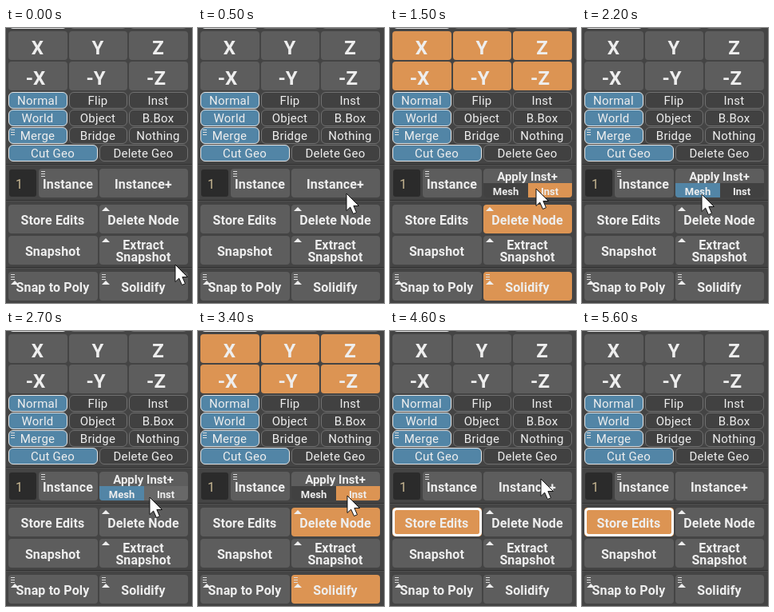
An HTML page that plays this animation: 233x344 px, repeating every 6 s.

```html
<!DOCTYPE html>
<html lang="en">
<head>
<meta charset="utf-8">
<title>Tool panel</title>
<style>
  html, body { margin: 0; width: 100%; height: 100%; overflow: hidden; background: #444; }
  svg { display: block; width: 233px; height: 344px; }
  text { font-family: Roboto, "Open Sans", sans-serif; fill: #eee; text-anchor: middle; }
  .big { font-size: 24px; font-weight: 700; }
  .bold { font-size: 16px; font-weight: 700; letter-spacing: .15px; }
  .apply { font-size: 15px; font-weight: 700; }
  .small { font-size: 13px; font-weight: 700; }
  .pill { font-size: 15px; letter-spacing: .25px; }
  .number { font-size: 16px; fill: #c9b994; }
</style>
</head>
<body>
<svg id="stage" viewBox="0 0 233 344"></svg>
<script>
const GRAY = '#5d5d5d', DARK = '#414141', HOVER = '#686868', PRESS = '#2b2b2b';
const BLUE = '#5285a6', ORANGE = '#dc9453', LIGHT = '#eee';
const LOOP = 6000, STEP = 100;
const stage = document.getElementById('stage');

function add(tag, attrs, parent = stage) {
  const node = document.createElementNS('http://www.w3.org/2000/svg', tag);
  for (const key in attrs) node.setAttribute(key, attrs[key]);
  return parent.appendChild(node);
}

function box(x, y, width, height, fill, rx = 4, parent = stage) {
  return add('rect', { x, y, width, height, fill, rx }, parent);
}

function label(content, x, y, style, parent = stage) {
  add('text', { x: x - .5, y, class: style }, parent).textContent = content;
}

function pill(name, x, y, width, selected) {
  const rect = box(x + .5, y + .5, width - 1, 20, selected ? BLUE : DARK, 5.5);
  rect.setAttribute('stroke', selected ? '#e4e4e4' : '#707070');
  label(name, x + width / 2, y + 16, 'pill');
}

function button(name, x, y, width) {
  const rect = box(x, y, width, 36, GRAY);
  label(name, x + width / 2, y + 25, 'bold');
  return rect;
}

// Signed labels sit slightly left of centre
function axisButton(name, x, y, width) {
  const rect = box(x, y, width, 36, GRAY);
  const shift = name.startsWith('-') ? 2.5 : 0;
  label(name, x + width / 2 - shift, y + 29, 'big');
  return rect;
}

function menuMark(x, y) {
  add('path', { d: `M${x} ${y + .5}h5m-5 3h5m-5 3h5`, stroke: '#ddd' });
}

function arrowMark(x, y) {
  add('path', { d: `M${x} ${y}l5-5 5 5z`, fill: LIGHT });
}

function separator(y) {
  add('path', { d: `M0 ${y + .5}H233`, stroke: '#303030' });
  add('path', { d: `M0 ${y + 1.5}H233`, stroke: '#505050' });
}

box(0, 0, 233, 344, '#444', 0);
const columns = [[3, 74], [79, 73], [154, 74]];
columns.forEach(([x, width], i) => pill('', x, -20, width, i === 0));

const lit = [];
['X', 'Y', 'Z'].forEach((axis, i) => {
  const [x, width] = columns[i];
  lit.push(axisButton(axis, x, 4, width), axisButton('-' + axis, x, 42, width));
});

[['Normal', 'Flip', 'Inst'], ['World', 'Object', 'B.Box'], ['Merge', 'Bridge', 'Nothing']]
  .forEach((row, r) => row.forEach((name, i) => {
    const [x, width] = columns[i];
    pill(name, x, 80 + r * 22, width, i === 0);
  }));
pill('Cut Geo', 3, 146, 112, true);
pill('Delete Geo', 117, 146, 111, false);
menuMark(6, 127);

[170, 215, 299].forEach(separator);

box(4, 177, 34, 34, PRESS, 3);
label('1', 17, 201, 'number');
button('Instance', 41, 176, 74);
menuMark(44, 179);

// Plain and split versions of the same button
const plain = add('g', {});
box(117, 176, 111, 36, GRAY, 4, plain);
label('Instance+', 172.5, 201, 'bold', plain);

const clip = add('clipPath', { id: 'rounded' });
box(117, 176, 111, 36, GRAY, 4, clip);
const split = add('g', {});
const face = add('g', { 'clip-path': 'url(#rounded)' }, split);
const applyBox = box(117, 176, 111, 36, GRAY, 4, face);
const meshBox = box(117, 194, 56, 18, BLUE, 0, face);
const instBox = box(173, 194, 55, 18, DARK, 0, face);
label('Apply Inst+', 172.5, 191, 'apply', split);
label('Mesh', 145.5, 209, 'small', split);
label('Inst', 200.5, 209, 'small', split);

const storeBox = button('Store Edits', 3, 221, 112);
const storeRing = add('rect', { x: 4.5, y: 222.5, width: 109, height: 33, rx: 4, fill: 'none', stroke: '#fff', 'stroke-width': 3 });
lit.push(button('Delete Node', 117, 221, 111));
button('Snapshot', 3, 260, 112);
box(117, 260, 111, 36, GRAY);
label('Extract', 172.5, 277, 'bold');
label('Snapshot', 172.5, 292, 'bold');
button('Snap to Poly', 3, 305, 112);
lit.push(button('Solidify', 117, 305, 111));
arrowMark(120, 229);
arrowMark(120, 268);
[6, 120].forEach(x => { menuMark(x, 308); arrowMark(x, 321); });

const cursor = add('path', {
  d: 'M0 0V21.5L4.7 17.1 8.5 25.5 12.5 23.7 8.9 15.5H15.5Z',
  fill: '#fff', stroke: '#111', 'stroke-width': 1
});

// time, x, y of the pointer tip
const pointerPath = [
  [0, 212, 296], [100, 210, 288], [300, 201, 248], [500, 186, 207], [700, 176, 196],
  [1000, 176, 197], [1400, 183, 201], [1600, 183, 201],
  [1700, 180, 203], [2000, 150, 208], [2400, 150, 208], [2700, 180, 208],
  [2900, 187, 206], [3700, 187, 206], [3900, 188, 191], [4000, 189, 185],
  [5100, 189, 185], [5200, 187, 194], [5300, 179, 217], [5400, 156, 262],
  [5500, 113, 326], [5600, 90, 360], [LOOP, 90, 360]
];

// time, mode, apply fill, mesh fill, inst fill
const states = [
  [0, 'plain', GRAY, BLUE, DARK],
  [600, 'mesh', GRAY, BLUE, DARK],
  [800, 'mesh', GRAY, BLUE, HOVER],
  [1400, 'mesh', GRAY, BLUE, PRESS],
  [1500, 'inst', GRAY, DARK, ORANGE],
  [1800, 'inst', GRAY, HOVER, ORANGE],
  [2000, 'inst', GRAY, PRESS, ORANGE],
  [2200, 'mesh', GRAY, BLUE, DARK],
  [2700, 'mesh', GRAY, BLUE, HOVER],
  [3200, 'mesh', GRAY, BLUE, PRESS],
  [3400, 'inst', GRAY, DARK, ORANGE],
  [4400, 'inst', PRESS, DARK, ORANGE],
  [4500, 'plain', GRAY, BLUE, DARK],
  [4600, 'store', GRAY, BLUE, DARK]
];

function pointerAt(t) {
  const next = pointerPath.findIndex(p => p[0] > t);
  const [t0, x0, y0] = pointerPath[next - 1], [t1, x1, y1] = pointerPath[next];
  const k = (t - t0) / (t1 - t0);
  return [Math.round(x0 + (x1 - x0) * k), Math.round(y0 + (y1 - y0) * k)];
}

function paint(t) {
  const [, mode, apply, mesh, inst] = states.filter(s => s[0] <= t).pop();
  const isSplit = mode === 'mesh' || mode === 'inst';
  const show = (node, on) => node.setAttribute('visibility', on ? 'visible' : 'hidden');
  const fill = (node, color) => node.setAttribute('fill', color);
  show(plain, !isSplit);
  show(split, isSplit);
  show(storeRing, mode === 'store');
  fill(storeBox, mode === 'store' ? ORANGE : GRAY);
  lit.forEach(node => fill(node, mode === 'inst' ? ORANGE : GRAY));
  fill(applyBox, apply);
  fill(meshBox, mesh);
  fill(instBox, inst);
  cursor.setAttribute('transform', `translate(${pointerAt(t)})`);
}

const start = performance.now();
function tick() {
  const t = Math.max(0, performance.now() - start) % LOOP;
  paint(Math.floor(t / STEP) * STEP);
  requestAnimationFrame(tick);
}
tick();
</script>
</body>
</html>
```
